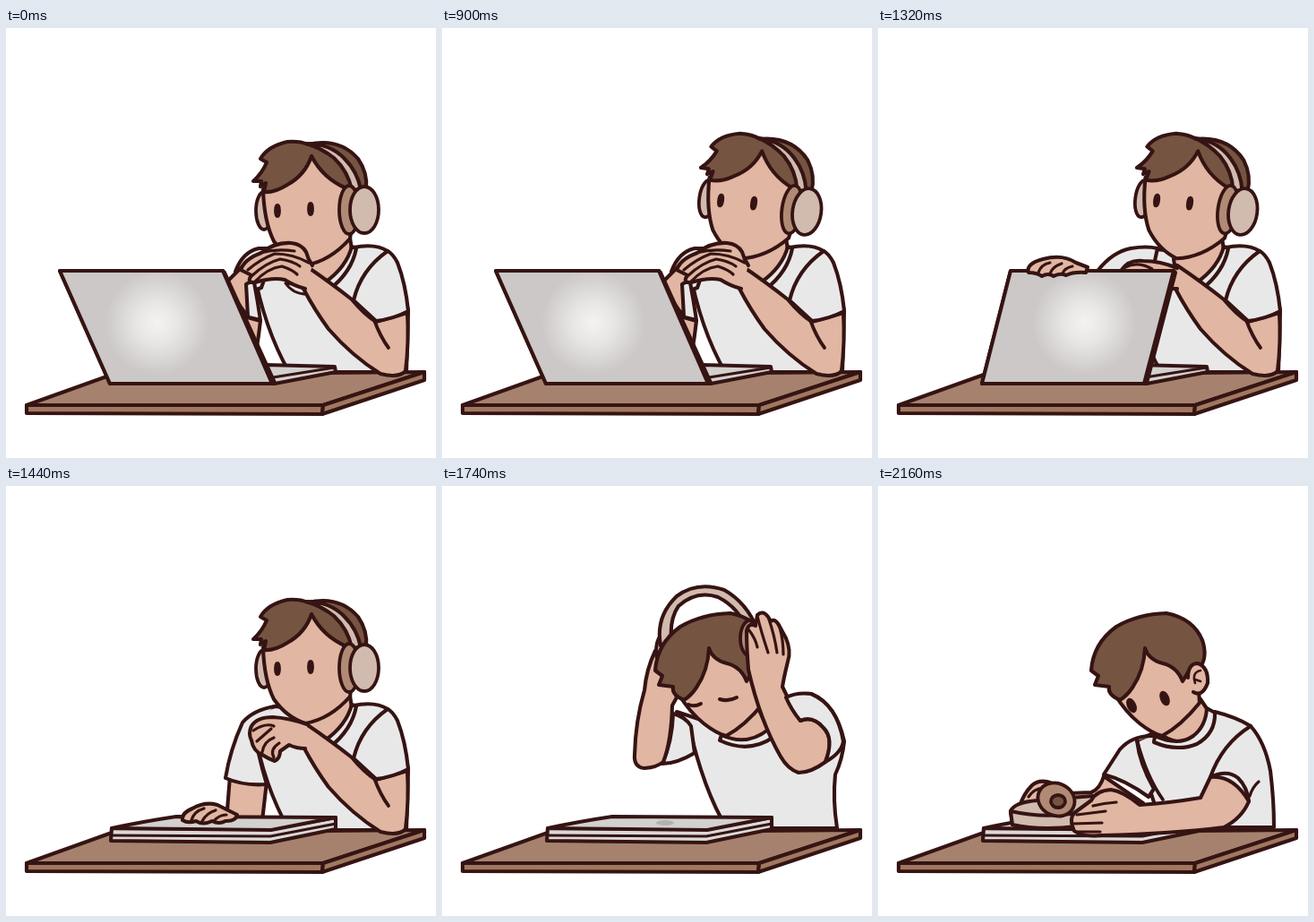
These frames come from a looping animation (480 by 480 pixels, 2580 ms). An HTML page:

```html
<!DOCTYPE html>
<html lang="en">
<head>
<meta charset="utf-8">
<title>Closing the laptop</title>
<style>
html, body { margin: 0; width: 100%; height: 100%; overflow: hidden; background: #fff; }
svg { display: block; width: 100%; height: 100%; }
#scene { fill: none; stroke: #351413; stroke-linecap: round; stroke-linejoin: round; }
</style>
</head>
<body>
<svg viewBox="0 0 480 480">
  <defs>
    <radialGradient id="glow" gradientUnits="userSpaceOnUse" cx="0" cy="0" r="58">
      <stop offset="0" stop-color="#f4f3f2"/>
      <stop offset=".4" stop-color="#e8e6e5"/>
      <stop offset="1" stop-color="#cbc8c7"/>
    </radialGradient>
  </defs>
  <g id="scene"></g>
</svg>
<script>
const INK = '#351413', SKIN = '#e1b6a2', HAIR = '#755442', SHIRT = '#e9e8e9',
  WOOD = '#a6826e', EDGE = '#a0785f', CUP = '#d1bbaf', PAD = '#b08a75', METAL = '#d2d1ce';
const LOOP = 2580;
const scene = document.getElementById('scene');
const glow = document.getElementById('glow');

const shape = (d, fill = 'none', w = 4.1) => `<path d="${d}" fill="${fill}" stroke-width="${w}"/>`;
const line = (d, w = 3.2) => shape(d, 'none', w);
const oval = (x, y, rx, ry, fill, turn = 0, w = 3.8) =>
  `<ellipse cx="${x}" cy="${y}" rx="${rx}" ry="${ry}" fill="${fill}" stroke-width="${w}" transform="rotate(${turn} ${x} ${y})"/>`;
const move = (x, y, art) => `<g transform="translate(${x} ${y})">${art}</g>`;
const spin = (a, x, y, art) => `<g transform="rotate(${a} ${x} ${y})">${art}</g>`;

// A tube with an outline, used for arms in motion
function limb(d, fill, w) {
  return `<path d="${d}" stroke-width="${w + 8}"/><path d="${d}" stroke="${fill}" stroke-width="${w}"/>`;
}
function arm(sx, sy, ex, ey, hx, hy) {
  const mx = sx + (ex - sx) * .55, my = sy + (ey - sy) * .55;
  return limb(`M${sx} ${sy}L${ex} ${ey}L${hx} ${hy}`, SKIN, 26) +
    limb(`M${sx} ${sy}L${mx} ${my}`, SHIRT, 34) +
    line(`M${hx - 5} ${hy - 12}l2 13M${hx + 4} ${hy - 12}l1 14`, 2.6);
}

const desk = shape('M23 421L118 387L467 384L354 421Z', WOOD) +
  shape('M23 421L354 421L353 431L23 430Z', EDGE) +
  shape('M354 421L467 384L467 393L353 431Z', EDGE);

function openLaptop(tx, ty) {
  glow.setAttribute('gradientTransform', `translate(${208 + tx * .7} ${397 + ty * .54})`);
  const x = 116 + tx, y = 397 + ty;
  return shape('M290 376L367 378L368 384L300 397L290 397Z', METAL) +
    line('M298 390L367 379') +
    shape(`M${x} ${y}L${x + 182} ${y}L${x + 184} ${y + 2}L300 396L116 397Z`, INK) +
    shape(`M${x} ${y}L${x + 182} ${y}L297 397L116 397Z`, 'url(#glow)');
}
const closedLaptop = (mark) =>
  shape('M118 382L117 396L295 398L368 383L368 370L296 383Z', '#dad9d8') +
  line('M117 390L295 391L368 377') +
  shape('M118 382Q150 375 190 369L368 370L296 384Z', METAL) +
  (mark ? oval(249, 376, 10, 3, '#b2b2ab', 0, 0) : '');

// Upright head wearing the headset
const headUp = oval(288, 204, 9, 21, CUP) +
  shape('M287 180Q288 216 299 238Q313 258 334 265Q362 260 384 235L392 180L345 140Z', SKIN) +
  shape('M288 183L290 173L284 177L285 171L276 171Q286 162 291 150L284 146Q292 132 314 127Q328 126 337 130Q372 122 393 146Q404 162 402 180L380 179Q354 168 341 143Q334 164 314 175Q300 184 288 183Z', HAIR) +
  shape('M335 129Q362 129 378 146Q392 160 396 180L386 181Q382 160 366 145Q352 134 335 129Z', CUP) +
  oval(383, 203, 11, 27, PAD) + oval(400, 203, 16, 26, CUP) +
  oval(303, 204, 2, 6, INK) + oval(340, 202, 2, 6, INK);
const raised = move(7, 2, spin(8, 400, 205, headUp));

const torso = shape('M300 246Q345 252 388 245Q412 240 426 249Q438 258 449 316L447 384L316 384Q288 335 276 268Q285 250 300 246Z', SHIRT);
const neck = shape('M330 258L384 234L386 248Q378 270 356 286L332 270Z', SKIN) +
  shape('M386 244Q380 267 356 284L362 291Q386 272 391 246Z', SHIRT);
// Open at the wrist, where a hand joins
const foreArm = shape('M334 265Q362 284 386 303Q400 320 413 328L448 318Q450 350 446 383Q438 391 418 386Q386 366 360 336Q344 314 332 291', SKIN);
const rightSleeve = line('M411 326Q418 345 427 357', 3.8) +
  shape('M426 249Q396 270 388 304L413 327Q432 325 449 316Q446 285 437 262Q432 252 426 249Z', SHIRT);

const foldedLeft = shape('M256 272Q264 250 282 246L300 246L285 290L256 300Z', SHIRT) +
  shape('M266 322L284 327Q282 345 279 362L266 340Z', SKIN) +
  shape('M268 284L267 322L284 326Q281 305 277 284Z', SHIRT) +
  shape('M264 266L246 284Q256 305 270 322L268 286L282 278', SKIN);
const foldedHands =
  shape('M342 265Q337 258 335 250Q330 241 318 240Q300 239 285 251Q266 258 262 270L274 276Q268 285 278 284Q298 278 311 281Q322 288 334 291', SKIN) +
  line('M270 270Q284 258 300 252Q320 252 338 262') +
  line('M274 277Q290 262 306 258Q320 260 328 266') +
  line('M278 283Q292 268 308 266Q320 270 325 275') +
  line('M284 251Q302 246 322 249');
const collarDip = shape('M312 285Q322 299 341 297L336 288Z', SHIRT, 3);

const lidHand = shape('M168 273Q165 263 184 258Q206 252 221 262L234 267L232 273Q218 272 210 276Q203 273 196 277Q190 273 183 277Q177 273 168 273Z', SKIN) +
  line('M179 273Q182 264 192 262M192 274Q195 266 205 263M206 274Q208 268 217 266');
const restHand = shape('M334 268Q315 260 296 260Q280 258 272 270L290 291L334 291', SKIN) +
  line('M276 267Q290 260 306 269');
const reachSleeve = shape('M246 270Q262 250 282 246Q300 243 312 246L302 292L246 292Z', SHIRT);

const leftArm = shape('M250 324L246 374L286 374L291 330Z', SKIN) +
  shape('M300 246Q276 250 264 264Q250 295 245 326Q265 335 291 333Q281 300 276 266', SHIRT);
const flatHand = shape('M197 373Q196 365 208 360Q222 352 236 356Q248 362 258 367Q257 374 245 374Q238 378 230 374Q220 379 212 374Q203 377 197 373Z', SKIN) +
  line('M207 373Q210 363 221 360M219 374Q224 365 234 362M232 374Q238 367 246 367');
const fist = shape('M336 266Q316 259 298 258Q280 258 274 268Q270 276 274 284Q276 296 286 300Q292 304 300 307Q306 304 306 296L316 289Q324 293 334 293', SKIN) +
  line('M276 273Q290 264 299 268M280 285L296 271M286 297Q288 285 299 281M299 303Q294 294 305 287');

// Bowed head
const headDown = (open, ear) =>
  shape('M264 232Q276 252 292 265Q306 276 317 279Q338 268 359 242L356 200L300 176Z', SKIN) +
  shape('M270 239Q256 233 258 224L242 222L246 212L238 206Q240 176 266 157Q290 143 322 142Q352 148 362 172Q368 190 360 202L346 208L340 218Q334 202 318 198Q302 194 298 181Q297 206 284 225Q278 234 270 239Z', HAIR) +
  (ear ? shape('M346 214Q346 198 357 198Q369 202 368 220Q362 236 352 230', SKIN) + line('M354 220Q350 208 360 206M354 216L360 218', 2.6) : '') +
  (open ? oval(283, 245, 3.2, 6.8, INK, -25) + oval(320, 237, 3.2, 6.8, INK, -22)
    : line('M275 244Q282 247 289 243M310 238Q320 241 329 236', 4));

const bowedTorso = shape('M262 252Q290 262 320 270L356 262Q382 230 412 232Q440 244 449 285Q447 305 439 322Q436 350 441 382L318 382Q292 340 275 265Z', SHIRT) +
  shape('M305 268L352 246L366 275Q345 294 314 280Z', SKIN) +
  shape('M312 278Q340 291 364 272L369 281Q342 299 310 284Z', SHIRT);
const liftLeft = shape('M258 254Q272 258 278 268L282 298Q262 310 246 310Q257 285 258 254Z', SHIRT) +
  shape('M238 184Q228 205 226 228Q216 262 215 300Q214 314 226 315Q240 314 247 308Q256 285 257 245L262 236L244 180Z', SKIN);
const liftRight = shape('M342 205Q340 180 340 162Q342 152 350 156L352 144Q358 138 364 146L367 151Q372 147 377 157L384 170Q390 184 386 196Q382 212 380 224Q390 245 400 262Q414 256 426 270Q438 282 428 308Q412 320 398 320Q386 316 378 302Q355 262 342 205Z', SKIN) +
  line('M352 145Q356 162 364 186M365 149Q371 166 374 186M377 158Q381 172 381 188M342 160Q350 170 352 180') +
  shape('M384 236Q390 250 400 262Q414 256 426 270Q438 282 428 308Q446 298 448 285Q441 244 412 232Q396 230 384 236Z', SHIRT);
const band = shape('M244 178Q238 146 262 123Q285 106 315 116Q340 130 352 160L341 162Q332 136 308 124Q284 116 264 134Q254 148 256 172Z', CUP);
const pad = oval(344, 170, 11, 20, PAD) + oval(349, 169, 8, 17, CUP);
const farPad = oval(248, 184, 9, 19, CUP);
const headset = farPad + band + pad;

const deskTorso = shape('M312 274Q345 298 376 252Q400 258 416 268Q432 286 438 318Q442 350 442 381L318 381Q302 340 289 284Z', SHIRT) +
  shape('M305 270L360 238L368 250Q364 278 338 286Q322 284 312 274Z', SKIN) +
  shape('M309 279Q335 291 352 279Q366 268 367 248L376 253Q377 276 356 288Q334 297 308 286Z', SHIRT);
const deskLeft = shape('M252 324Q248 338 238 342L212 343Q186 322 172 334Q162 344 158 358L215 364L296 354Z', SKIN) +
  line('M168 347Q174 338 184 337') +
  shape('M308 279Q284 278 270 294L252 322Q276 328 302 347L308 338Q292 310 289 284', SHIRT) +
  line('M289 284Q300 325 318 350', 3.8);
const deskRight = shape('M371 325L360 348Q324 354 292 356Q274 341 260 339Q244 340 238 351L219 365Q213 372 219 385Q228 392 250 390Q330 388 386 381Q406 371 414 352Q396 322 371 325Z', SKIN) +
  line('M222 367L254 363M218 377L250 376M222 386L248 386M266 353Q252 354 240 357') +
  shape('M416 268Q384 288 371 325Q390 316 402 326Q412 336 414 352', SHIRT) +
  line('M415 346Q418 336 425 330');
const layingSet = shape('M148 363Q152 353 178 351L240 346Q260 346 262 353L224 380Q180 386 150 378Z', CUP) +
  shape('M148 363Q188 372 226 364L222 380Q180 385 150 378Z', CUP) +
  oval(199, 350, 21, 18, PAD, 25) + oval(201, 352, 8, 7, HAIR);

const folded = (head, dip) => torso + foldedLeft + neck + head + (dip ? collarDip : '') +
  foreArm + rightSleeve + foldedHands + openLaptop(-56, -126);

function closing(tx, ty, head) {
  const dx = tx - 32, dy = ty + 126;
  const reach = dx ? limb(`M268 278L${226 + dx} ${270 + dy}`, SKIN, 17) : '';
  return torso + reach + reachSleeve + neck + head + foreArm + rightSleeve + restHand +
    openLaptop(tx, ty) + move(dx, dy, lidHand);
}
const lift = (drop) => bowedTorso + liftLeft + move(0, drop, farPad + band) + headDown(false) +
  move(0, drop, pad) + liftRight + closedLaptop(true);
const carry = (left, right, set) => bowedTorso + headDown(false, true) + set +
  arm(272, 270, ...left) + arm(423, 264, ...right) + closedLaptop(true);
const putDown = (dy, open) => deskTorso + headDown(open, true) + closedLaptop() +
  move(0, dy, deskLeft + layingSet) + deskRight;

const poses = [
  [0, () => folded(headUp, true)],
  [900, () => folded(raised)],
  [1140, () => closing(-56, -126, raised)],
  [1260, () => closing(-8, -135, raised)],
  [1320, () => closing(32, -126, raised)],
  [1380, () => closing(64, -76, headUp)],
  [1440, () => torso + leftArm + neck + headUp + foreArm + rightSleeve + fist + closedLaptop() + flatHand],
  [1560, () => torso + neck + headUp + arm(268, 276, 238, 340, 262, 270) + arm(427, 276, 428, 356, 372, 262) + closedLaptop()],
  [1620, () => torso + neck + headUp + arm(268, 276, 236, 294, 281, 206) + arm(427, 272, 424, 312, 400, 208) + closedLaptop()],
  [1680, () => lift(14)],
  [1740, () => lift(0)],
  [1800, () => carry([220, 220, 238, 105], [414, 205, 346, 96], move(-4, -78, headset))],
  [1860, () => carry([205, 260, 172, 176], [390, 296, 284, 176], move(-72, 4, headset))],
  [1920, () => carry([220, 318, 150, 270], [388, 336, 258, 270], move(-96, 98, headset))],
  [1980, () => putDown(-16, false)],
  [2040, () => putDown(-5, false)],
  [2160, () => putDown(0, true)]
];

let shown = -1;
function draw(t) {
  let i = poses.length - 1;
  while (poses[i][0] > t) i--;
  if (i === shown) return;
  shown = i;
  scene.innerHTML = desk + poses[i][1]();
}
function tick() {
  draw(performance.now() % LOOP);
  requestAnimationFrame(tick);
}
tick();
</script>
</body>
</html>
```
